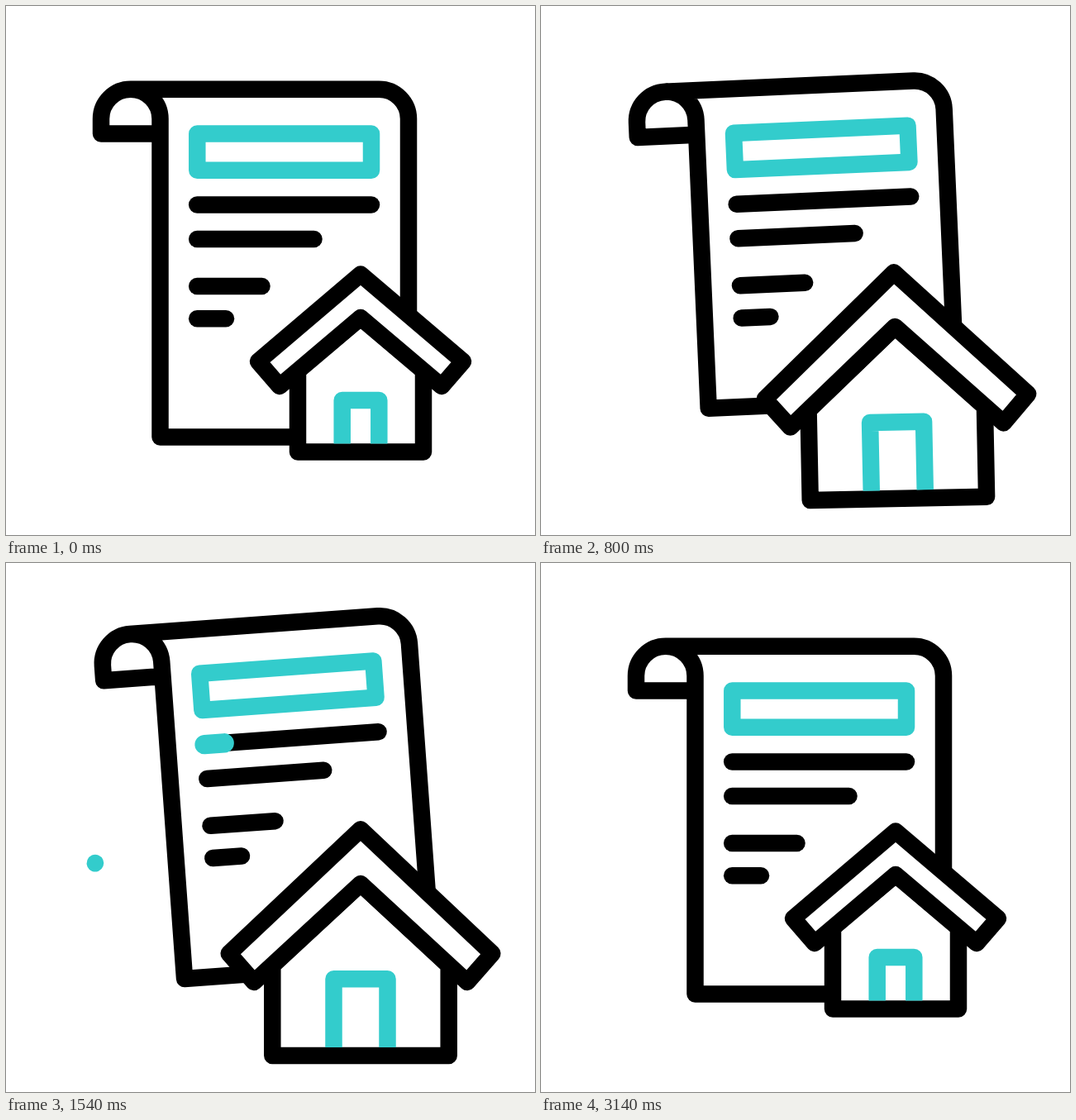
An HTML page with a canvas that plays this animation: 640x640 px, repeating every 3600 ms.

```html
<!DOCTYPE html>
<html>
<head>
<meta charset="utf-8">
<title>House contract</title>
<style>
  html, body { margin: 0; height: 100%; overflow: hidden; background: #fff; }
  canvas { display: block; width: 640px; height: 640px; }
</style>
</head>
<body>
<canvas id="stage" width="640" height="640"></canvas>
<script>
const ctx = document.getElementById('stage').getContext('2d');
const LOOP = 3600, STROKE = 20.5, BLACK = '#000', TEAL = '#33cccc';

const clamp = v => Math.max(0, Math.min(1, v));
const lerp = (a, b, k) => a + (b - a) * k;
const ease = (t, from, to) => (1 - Math.cos(Math.PI * clamp((t - from) / (to - from)))) / 2;
const hop = (t, from, to, height) => -height * Math.sin(Math.PI * clamp((t - from) / (to - from))) ** 2;

// Eased value through [time, value] keys
function track(t, keys) {
  let value = keys[0][1];
  for (let i = 1; i < keys.length; i++)
    value += (keys[i][1] - keys[i - 1][1]) * ease(t, keys[i - 1][0], keys[i][0]);
  return value;
}

const docTurn = [[220, 0], [380, -0.3], [800, -2.5], [840, -2.5], [1120, 4.9], [1520, -4.2], [1820, 0]];
const docShrink = [[220, 0], [440, 72], [580, 72], [1020, 0]];
const houseTurn = [[320, 0], [580, 3], [910, -2.5], [1100, 0]];
const houseGrow = [[400, 0], [740, 1], [2740, 1], [3120, 0]];
const houseSquash = [[2600, 0], [2760, 1], [3000, 0]];

const textLines = [[240.5, 442], [282, 372.5], [339, 309.5], [378.3, 266]];

function stroke(color, width = STROKE, cap = 'round') {
  ctx.strokeStyle = color;
  ctx.lineWidth = width;
  ctx.lineCap = cap;
  ctx.stroke();
}

function polyline(points, closed) {
  ctx.beginPath();
  points.forEach(([x, y]) => ctx.lineTo(x, y));
  if (closed) ctx.closePath();
}

function shape(points) {
  polyline(points, true);
  ctx.fillStyle = '#fff';
  ctx.fill();
  stroke(BLACK);
}

function turn(degrees, x, y) {
  ctx.translate(x, y);
  ctx.rotate(degrees * Math.PI / 180);
  ctx.translate(-x, -y);
}

function drawDocument(t) {
  const bottom = 521.5 - track(t, docShrink);
  ctx.save();
  ctx.translate(0, hop(t, 241, 845, 72) + hop(t, 1040, 1672, 70));
  turn(track(t, docTurn), 302, 117);

  ctx.beginPath();
  ctx.moveTo(186.5, 154.5);
  ctx.lineTo(115, 154.5);
  ctx.lineTo(115, 136.5);
  ctx.arc(150.75, 136.5, 35.75, Math.PI, 0);
  ctx.lineTo(186.5, bottom);
  ctx.lineTo(487, bottom);
  ctx.lineTo(487, 136.5);
  ctx.arc(451.25, 136.5, 35.75, 0, -Math.PI / 2, true);
  ctx.lineTo(150.75, 100.75);
  stroke(BLACK);

  ctx.beginPath();
  ctx.rect(231.3, 154.5, 210.7, 44.3);
  stroke(TEAL);

  textLines.forEach(([y, right], i) => {
    polyline([[231.2, y], [right, y]]);
    stroke(BLACK);
    const start = 1484 + 165 * i;
    if (t <= start || t >= start + 455) return;
    const head = ease(t, start, start + 260);
    const tail = ease(t, start + 290, start + 455);
    polyline([[lerp(231, right, tail), y], [lerp(231, right, head), y]]);
    stroke(TEAL, 23.5);
  });
  ctx.restore();
}

function drawSwoosh(t) {
  if (t <= 860 || t >= 1560) return;
  const head = ease(t, 860, 1200), tail = ease(t, 1180, 1550);
  const bezier = (k, a, b, c, d) => {
    const j = 1 - k;
    return j * j * j * a + 3 * j * j * k * b + 3 * j * k * k * c + k * k * k * d;
  };
  const points = [];
  for (let i = 0; i <= 40; i++) {
    const k = lerp(tail, head, i / 40);
    points.push([bezier(k, 242, 130, 78, 108), bezier(k, 569, 533, 440, 363)]);
  }
  polyline(points);
  stroke(TEAL);
}

function drawHouse(t) {
  const grow = track(t, houseGrow), squash = track(t, houseSquash);
  const size = (small, big) => lerp(small, big, grow);
  const mid = 429;
  const base = size(539.5, 596), inner = size(377, 388);
  const wall = size(76, 106.7), wallTop = size(441, 487);
  const door = size(22.3, 32.5), doorTop = size(477, 503.3);
  const tip = size(124, 159.3), tipY = size(430, 472.5);
  const eave = size(98, 129), eaveY = size(460, 507);

  ctx.save();
  ctx.translate(0, hop(t, 230, 800, 56));
  turn(track(t, houseTurn), mid, 425);
  ctx.translate(mid, base + 10);
  ctx.scale(1 + 0.16 * squash, 1 - 0.1 * squash);
  ctx.translate(-mid, -base - 10);

  shape([[mid - wall, wallTop], [mid - wall, base], [mid + wall, base], [mid + wall, wallTop], [mid, inner]]);
  polyline([[mid - door, base - 10], [mid - door, doorTop], [mid + door, doorTop], [mid + door, base - 10]]);
  stroke(TEAL, STROKE, 'butt');
  shape([
    [mid, size(324.5, 322.3)], [mid + tip, tipY], [mid + eave, eaveY],
    [mid, inner], [mid - eave, eaveY], [mid - tip, tipY]
  ]);
  ctx.restore();
}

function frame() {
  const t = performance.now() % LOOP;
  ctx.clearRect(0, 0, 640, 640);
  ctx.lineJoin = 'round';
  drawDocument(t);
  drawSwoosh(t);
  drawHouse(t);
  requestAnimationFrame(frame);
}
frame();
</script>
</body>
</html>
```
